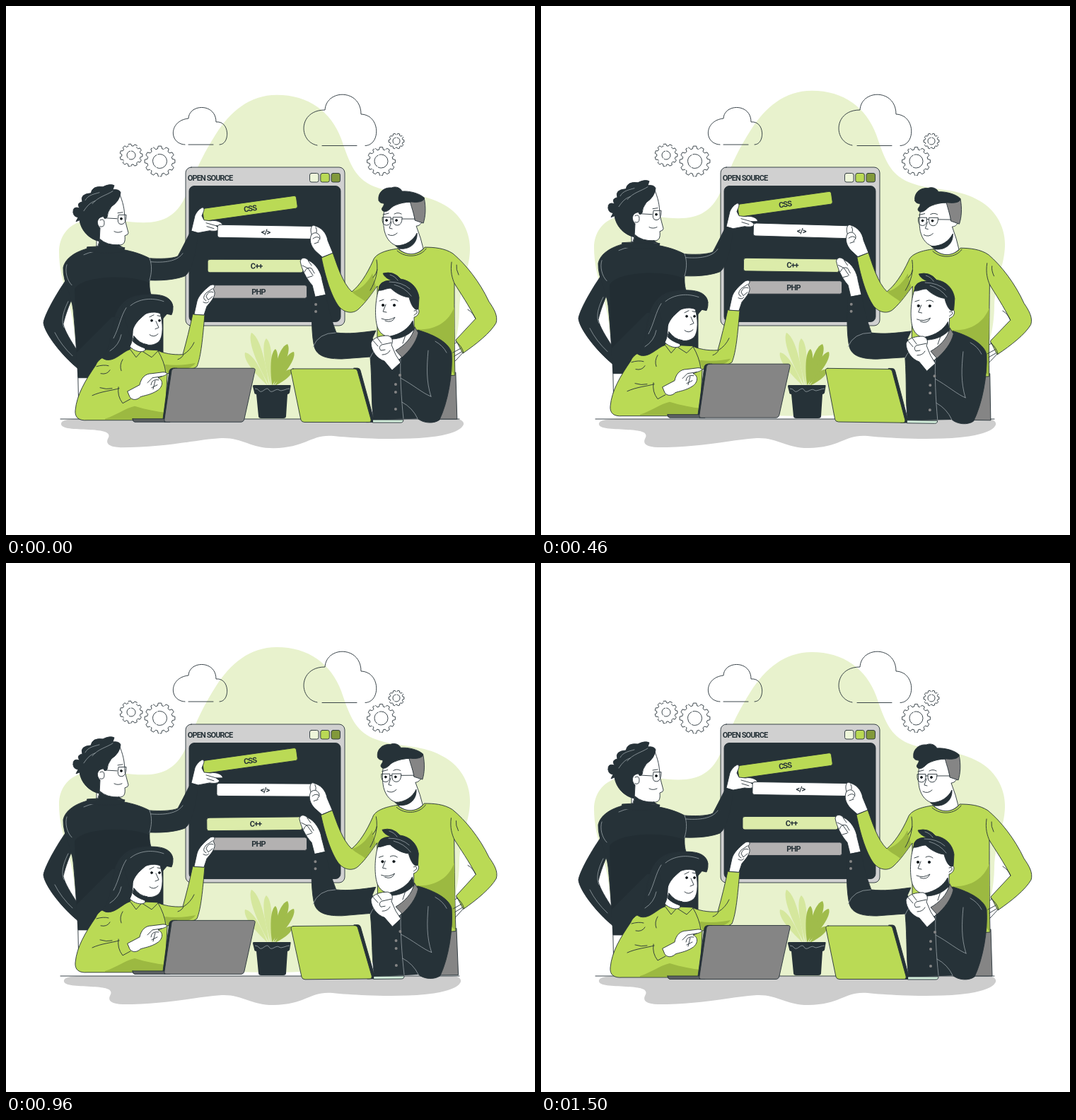
An HTML page for the animation above (1.54 s loop, 748 by 748 pixels).

```html
<!DOCTYPE html>
<html lang="en">
<head>
<meta charset="utf-8">
<title>Open source</title>
<style>
html, body { margin: 0; height: 100%; overflow: hidden; background: #fff; }
svg { display: block; width: 100vw; height: 100vh; }
text { font: 600 11px Roboto, "Liberation Sans", sans-serif; font-stretch: 75%; letter-spacing: -.9px; text-anchor: middle; fill: #263238; stroke: none; }
.o { stroke: #263238; stroke-width: .9; stroke-linejoin: round; stroke-linecap: round; }
.line { fill: none; }
.thin { fill: none; stroke: #aab3b8; stroke-width: .7; }
.dark { fill: #263238; }
.green { fill: #bada55; }
.shade { fill: #9cb941; stroke: none; }
.white { fill: #fff; }
.grey { fill: #858585; }
.window { fill: #d0d0d0; }
</style>
</head>
<body>
<svg viewBox="0 0 748 748">
  <path id="blob" fill="#e8f2cd" d="M75 348C75 326 88 310 106 305C140 296 172 309 205 306C235 303 248 285 258 260C270 228 281 206 297 181C317 150 344 126 383 126C428 126 460 150 474 188C485 219 492 245 522 256C552 268 585 263 615 279C642 292 657 318 656 346C655 375 642 395 641 430C640 520 590 586 375 586C200 586 108 566 97 465C94 420 75 390 75 348Z"/>

  <g class="o line">
    <path d="M253 196C230 195 230 162 258 159C259 138 297 137 297 164C317 162 317 196 302 196M258 196H293"/>
    <path d="M440 197C413 192 413 147 451 147C453 117 502 117 502 153C530 154 530 197 508 197.500M447 197.500H496"/>
    <g id="gears"></g>
  </g>

  <path id="shadow" fill="#cdcdcd" d="M82 590C84 584 100 584 120 584H630C640 584 644 588 643 592C640 602 615 608 592 610C550 614 490 611 462 608C430 605 425 624 378 625C345 625 335 610 305 611C270 613 230 624 165 624C145 623 144 617 148 610C151 602 140 600 120 599C100 598 80 598 82 590Z"/>

  <g class="o">
    <rect class="window" x="254" y="228" width="225" height="224" rx="8"/>
    <rect class="dark" x="259" y="254.500" width="214" height="192" rx="7"/>
    <rect fill="#eef6da" x="429.500" y="236.500" width="12.500" height="12.500" rx="2.500"/>
    <rect class="green" x="444.800" y="236.500" width="12.500" height="12.500" rx="2.500"/>
    <rect fill="#82993b" x="460" y="236.500" width="12.500" height="12.500" rx="2.500"/>
    <text x="288.500" y="246.500">OPEN SOURCE</text>
    <path d="M77 584H641"/>
  </g>

  <g id="leaves"></g>
  <path class="dark" d="M350 536H402Q403 536 402.500 538L401 547Q400 549 398 549L396 580Q396 583 392 583H361Q357 583 357 580L354 549Q351 549 351 546L349 538Q349 536 350 536Z"/>
  <path class="thin" d="M352 541q4 0 6 3t7-1t7 0t7 1t7-1t7 0t8-2"/>

  <g id="leftMan" class="o">
    <path class="white" d="M102 515H200V562H103Z"/>
    <path class="dark" d="M92 378C75 400 55 435 53 448C54 462 78 494 103 514L101 488C92 474 83 460 81 450C84 436 90 422 94 412Z"/>
    <path class="dark" d="M116 343C100 347 84 356 81 370C80 390 93 410 95 430C99 470 100 500 102 526H222V430C206 420 202 405 203 388C225 389 243 386 253 382C264 374 269 345 272 321L262 317C257 327 250 341 243 354C235 358 215 358 203 357C192 351 178 347 167 345Z"/>
    <path fill="#222d33" stroke="none" d="M97 400C110 380 180 380 203 392V440H150L100 490Z"/>
    <path class="thin" d="M86 366C83 375 86 388 93 395M203 357C207 367 206 378 203 388M88 418C78 438 79 448 82 455M69 462Q78 480 94 495M110 352Q125 345 140 348M205 362C230 364 244 359 250 350"/>
    <path class="white" d="M128 340V300C140 296 150 275 160 265C165 276 168 288 168 302L173 321Q173 324 168 325C169 334 167 339 159 338L166 342Q147 348 128 340Z"/>
    <path class="dark" d="M115 341Q140 339 168 342L166 348Q138 351 114 347ZM133 330Q143 339 160 338L163 341H130Z"/>
    <path class="dark" d="M95 292Q94 283 104 286Q99 279 108 277Q104 266 120 265Q122 254 137 256Q147 251 153 254L151 260Q160 259 162 264Q161 276 149 284Q143 292 143 299Q139 303 138 298C130 298 126 307 133 314L132 333C118 330 106 318 104 303L99 305L102 299Q95 298 95 292Z"/>
    <path class="thin" d="M112 275C116 267 126 266 132 264M122 280C130 270 142 268 151 262M110 290C116 281 120 278 126 276"/>
    <path class="line" d="M139 300L157 301M159 296Q156 309 163 309T170 296ZM153 319Q158 322 164 319M158 293L165 292M133 303Q139 300 139 307T133 312"/>
    <circle cx="163" cy="301" r="1.500"/>
    <g transform="translate(345 286.500) rotate(-8)">
      <rect class="green" x="-67" y="-9" width="134" height="18" rx="3"/>
      <text y="4">CSS</text>
    </g>
    <path class="white" d="M262 318L267 297C270 290 274 287 278 285C282 287 279 291 277 297L280 303L289 304C299 302 308 308 306 311L297 311L302 315C300 319 294 319 288 318L272 321Z"/>
    <path class="line" d="M283 307L297 311M284 312L294 315"/>
  </g>

  <g id="rightMan" class="o">
    <path class="grey" d="M612 518H636L638 584H612Z"/>
    <path class="white" d="M630 482C634 475 642 473 645 477L648 488L636 501L631 506Z"/>
    <path class="green" d="M554 343C538 345 522 350 519 360C510 380 500 395 489 404C476 392 468 366 462 349L446 356C452 385 460 410 470 424C478 434 490 436 498 429C510 418 518 405 525 396V530L635 522C634 480 634 430 634 392C642 405 655 424 664 442L636 472L646 491C665 478 685 462 693 448C696 438 690 428 683 418C670 390 650 365 632 350C620 342 605 341 592 341C585 352 565 354 554 343Z"/>
    <path class="shade" d="M580 457C606 459 626 447 634 425V521L600 480ZM518 378C512 391 500 402 489 404C496 411 503 413 508 418Q518 406 523 397Z"/>
    <path class="line" d="M524 359C527 376 522 390 515 402M519 384Q524 378 525 373M630 362C628 376 631 385 634 392M640 380Q636 372 637 366M636 474Q645 481 647 490M664 442Q660 433 653 429M632 490L643 484M634 495L644 489"/>
    <path class="white" d="M535 288C545 285 555 277 573 277L578 300C584 296 590 300 588 305C586 310 582 311 580 311L586 328L590 343C579 354 565 352 556 344V340C545 338 538 330 535 318C533 308 533 298 535 288Z"/>
    <path class="dark" d="M551 339C566 339 576 331 581 321C582 336 570 345 556 343Z"/>
    <path class="line" d="M553 346C565 357 586 355 594 343"/>
    <path class="grey" d="M571 276C582 277 589 273 591 271C594 285 593 298 590 307L578 303C577 295 575 290 571 276Z"/>
    <path class="dark" d="M527 275C525 265 533 256 545 257C552 254 558 258 560 262C570 261 585 265 591 271C592 277 580 278 574 277C565 277 552 278 545 285C541 289 537 292 533 290C528 286 536 283 534 279C531 279 528 278 527 275Z"/>
    <path class="line" d="M532 299Q531 310 538 310T544 299ZM547 299Q546 310 553 310T560 299ZM560 301L578 301M544 301H547M545 305L542 314L546 315M540 323Q547 327 553 321M533 295L541 293M549 294Q554 291 559 294"/>
    <circle cx="538" cy="303" r="1.500"/><circle cx="552" cy="303" r="1.500"/>
    <g transform="translate(367 319.500) rotate(.9)">
      <rect class="white" x="-68" y="-9" width="136" height="18" rx="3"/>
      <text y="4">&lt;/&gt;</text>
    </g>
    <path class="white" d="M447 355L437 346C431 339 428 331 432 323C429 314 433 308 437 311C445 313 453 320 455 332L462 349Z"/>
    <path class="line" d="M432 323Q437 319 441 322Q447 327 441 333M434 329Q440 324 444 329M436 336L442 334M438 313Q440 317 439 320"/>
  </g>

  <g id="woman" class="o">
    <g>
      <rect fill="#b3b1b1" x="291" y="395" width="134.500" height="18.500" rx="3"/>
      <text x="357" y="408">PHP</text>
    </g>
    <path class="dark" d="M136 498C150 482 146 460 154 440C160 420 175 409 195 409C220 406 235 412 236 426L215 450L195 492C180 494 158 510 136 498Z"/>
    <path class="green" d="M175 484L160 490C140 493 130 500 127 508C112 530 100 550 98 572C97 582 103 587 115 586H225L228 520C245 518 262 516 270 510C276 495 278 470 281 437L264 436C260 455 255 475 250 493C235 494 222 491 214 487L195 486Z"/>
    <path class="shade" d="M140 584C158 578 168 569 182 566C198 571 215 574 225 575V585H140ZM224 507Q245 510 268 505Q262 515 228 519Z"/>
    <path class="line" d="M128 510Q138 507 145 509M122 551C135 545 150 544 160 541M133 540Q142 543 150 541M159 539Q157 552 165 562L176 556M215 488Q224 503 226 519M251 493Q249 498 243 500M266 476Q261 487 251 493M175 485L184 497L192 488L206 497L215 488M134 520Q143 522 147 515M165 500Q160 508 163 516"/>
    <path class="dark" d="M136 498C150 482 148 460 155 440L182 445L175 486C164 489 150 508 136 498Z"/>
    <path class="white" d="M175 482C182 470 176 458 183 446C190 437 205 430 218 435C222 447 223 468 216 475C210 480 202 481 195 478L197 487C192 491 182 489 175 482Z"/>
    <path class="dark" d="M181 467Q189 478 200 479L196 484Q184 480 179 474Z"/>
    <path class="dark" d="M176 470C180 447 190 443 200 433C208 431 216 430 220 434L234 437C238 428 236 418 228 415C205 402 175 409 164 425Z"/>
    <path class="thin" d="M176 424C188 414 207 412 223 418M152 470C160 455 162 439 170 427M147 488Q160 480 163 465"/>
    <path class="line" d="M212 446L216 455L211 457M203 465Q209 470 215 464M203 440L209 437M214 438L219 439"/>
    <circle cx="206" cy="445" r="1.500"/><circle cx="217" cy="445" r="1.500"/>
    <path class="white" d="M266 436L270 418C272 410 280 402 289 395C295 393 297 396 293 400L295 405C296 412 288 420 284 425L280 437Z"/>
    <path class="line" d="M292 400L283 406Q276 414 283 417M293 405Q286 402 283 411L286 416L292 411M279 419Q284 422 287 418"/>
    <path class="white" d="M172 545L189 536C191 526 197 520 206 520L222 518C230 518 229 522 220 524L215 526C223 529 222 539 214 544C205 550 195 551 190 553C185 558 178 558 175 553Z"/>
    <path class="line" d="M220 524L207 526L200 533M216 529Q206 527 205 536M214 536L206 540M211 530L208 542"/>
    <path class="dark" d="M236 512.500H242L232 588.500H225Q221 588 222 584L231 516Q232 512.500 236 512.500Z"/>
    <path fill="#5c6062" d="M179 584H225V588.500H182Q179 588 179 584Z"/>
    <path class="grey" d="M238 512.500H349Q353 512.500 352 516L337 584Q336 588.500 332 588.500H227Q223 588.500 224 584L234 516Q235 512.500 238 512.500Z"/>
  </g>

  <g id="bottomMan" class="o">
    <g>
      <rect fill="#dcecaa" x="285" y="358.500" width="135" height="18.500" rx="3"/>
      <text x="354" y="371.500">C++</text>
    </g>
    <path class="dark" d="M452 408L433 413C432 440 432 465 436 482C440 496 455 499 475 499L515 496C518 530 516 560 520 585L582 583C590 590 605 591 613 585C625 560 632 520 630 490C626 474 600 463 582 458L560 490L545 500L518 470L523 459C500 462 485 464 467 462C460 445 456 425 452 408Z"/>
    <path class="thin" d="M434 482Q442 462 466 462M558 496C557 520 559 555 562 583M558 526C575 535 590 548 601 552M597 487C595 510 594 530 601 552M607 474Q618 480 623 490M515 497Q520 485 528 484M560 560Q575 568 582 583"/>
    <g fill="#858585" stroke="none">
      <circle cx="438" cy="422" r="2"/><circle cx="438" cy="432" r="2"/>
      <circle cx="557" cy="522" r="2"/><circle cx="551" cy="535" r="2"/><circle cx="551" cy="546" r="2"/><circle cx="551" cy="570" r="2"/>
    </g>
    <path class="white" d="M528 398C521 415 521 445 526 456C530 465 538 468 545 468L540 490L556 500C568 488 576 474 577 456V440C585 438 587 426 578 427L570 405C560 396 545 394 528 398Z"/>
    <path class="grey" d="M578 454L583 462C580 476 570 488 560 497L551 487C563 480 574 470 578 454Z"/>
    <path class="dark" d="M543 467C558 464 569 456 575 445L577 457C569 465 560 470 546 471Z"/>
    <path class="dark" d="M527 402Q526 388 545 388Q535 384 533 378Q548 374 558 386C572 388 582 398 584 412L583 428C578 433 572 421 570 412C560 411 550 405 544 399C537 399 532 403 527 402Z"/>
    <path class="thin" d="M542 390Q560 390 571 400M549 394Q564 398 573 410M543 380Q550 382 554 388"/>
    <path class="line" d="M537 422L533 432L538 433M531 442Q541 446 550 440Q546 449 536 445M528 417L534 415M544 416Q549 413 554 417M577 431Q582 429 581 434L577 437M565 465L561 477"/>
    <circle cx="533" cy="423" r="1.700"/><circle cx="549" cy="423" r="1.700"/>
    <path class="white" d="M516 476C520 468 530 466 540 466C546 468 548 473 545 479L551 493L558 504L546 515L535 502C525 499 516 488 516 476Z"/>
    <path class="line" d="M545 476L531 479Q526 482 530 487L536 486M519 473L526 481M532 493Q540 493 543 487M525 469L531 477"/>
    <path class="white" d="M437 411L433 395C424 385 418 372 416 361C418 354 424 356 428 360C438 364 446 378 447 388L452 408Z"/>
    <path class="line" d="M419 367L427 371L434 381M422 376Q425 368 432 371L436 378M426 384L433 382M427 360L432 367"/>
    <path class="dark" d="M492 512H497Q500 512 501 515L520 584Q521 588.500 517 588.500H510Z"/>
    <path fill="#d4efdc" d="M519 585H562Q562 589 558 589H519Z"/>
    <path class="green" d="M406 513H493Q496 513 497 516L516 584Q517 588.500 513 588.500H422Q418 588.500 417 585L403 517Q402 513 406 513Z"/>
  </g>
</svg>
<script>
const byId = id => document.getElementById(id);

function gear(x, y, radius, hub, teeth) {
  const step = 2 * Math.PI / teeth;
  const corners = [[-.34, .83], [-.2, 1], [.2, 1], [.34, .83]];
  let d = '';
  for (let i = 0; i < teeth; i++)
    for (const [turn, reach] of corners) {
      const a = (i + turn) * step, r = radius * reach;
      d += (d ? 'L' : 'M') + (x + r * Math.cos(a)) + ' ' + (y + r * Math.sin(a));
    }
  const dash = `${radius * 2.4} 2 ${radius} 2`;
  return `<path stroke-dasharray="${dash}" d="${d}Z"/><circle stroke-dasharray="${hub * 2} 2" cx="${x}" cy="${y}" r="${hub}"/>`;
}

function leaf(tipX, tipY, baseX, baseY, width, color) {
  const dx = tipX - baseX, dy = tipY - baseY, length = Math.hypot(dx, dy);
  const at = (k, side) => `${baseX + dx * k - dy / length * width * side} ${baseY + dy * k + dx / length * width * side}`;
  return `<path fill="${color}" d="M${baseX} ${baseY}C${at(.55, 1)} ${at(.9, 1)} ${tipX} ${tipY}C${at(.9, -1)} ${at(.55, -1)} ${baseX} ${baseY}"/>`;
}

byId('gears').innerHTML = gear(177, 211, 16, 6, 11) + gear(217.5, 219.5, 21.5, 10, 12) +
  gear(530.5, 219.5, 20, 9.5, 12) + gear(552, 191, 11, 5, 10);

const pale = '#d5e79d', deep = '#a0bc4b';
byId('leaves').innerHTML = leaf(347, 462, 372, 537, 8, pale) + leaf(338, 490, 370, 537, 7, pale) +
  leaf(368, 470, 374, 537, 7, pale) + leaf(381, 485, 376, 537, 6, deep) + leaf(398, 478, 376, 537, 8, deep) +
  leaf(407, 489, 378, 537, 7, deep) + leaf(404, 514, 380, 537, 6, deep);

// Linear interpolation through [position, value] stops.
function keyframes(p, stops) {
  const i = Math.max(1, stops.findIndex(([at]) => at >= p));
  const [a, from] = stops[i - 1], [b, to] = stops[i];
  return from + (to - from) * (p - a) / (b - a);
}

const LOOP = 1540, PERIOD = 1500;
const float = [[0, 0], [.5, -10], [1, 0]];
const sway = [[0, 0], [.25, 1], [.75, -1], [1, 0]];
const beat = [[0, 1], [.1, 1.1], [.3, 1], [.4, 1], [.5, 1.1], [.6, 1], [1, 1]];
const move = (id, value) => byId(id).setAttribute('transform', value);

function draw(now) {
  const p = Math.min(1, (20 + .985 * (now % LOOP)) / PERIOD);
  const lift = `translate(0 ${keyframes(p, float)})`;
  for (const id of ['blob', 'leftMan', 'woman']) move(id, lift);
  const angle = keyframes(p, sway);
  move('rightMan', `rotate(${angle} 497 420)`);
  move('bottomMan', `rotate(${angle} 458 482)`);
  move('shadow', `translate(362.5 604.5) scale(${keyframes(p, beat)}) translate(-362.5 -604.5)`);
  requestAnimationFrame(draw);
}
draw(performance.now());
</script>
</body>
</html>
```
